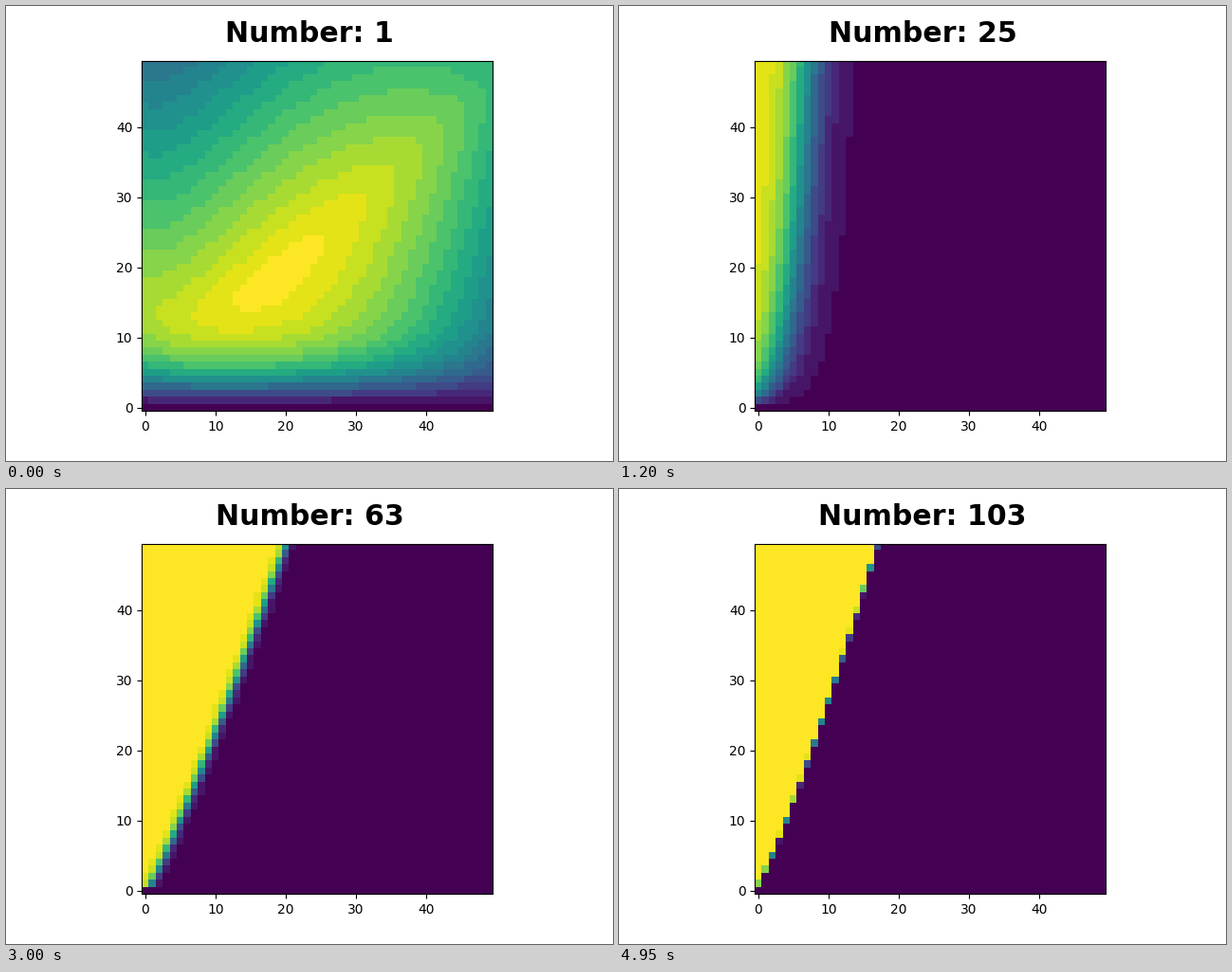
A matplotlib script for the animation above (5 s loop, 640 by 480 pixels).

```python
import numpy as np
import matplotlib.pyplot as plt
from matplotlib.animation import FuncAnimation

SIZE = 50
FRAMES = 100
COUNT = 104
SLOPE_AT, FRONT_AT = 9, 25
ZOOM = 4.3  # how much narrower the front is than the slope

X = np.arange(SIZE)
Y = np.maximum(np.arange(SIZE), 1)[:, None]
# Colour steps, a little closer together at the bright end
LEVELS = 1 - (1 - np.linspace(0, 1, 20)) ** 1.1

# Key poses of the sharp front: number, x at bottom, x at top, curvature
NUMBER, FOOT, REACH, POWER = zip(
    (25, -2, 7.1, 0.01),
    (46, 0.1, 11.5, 0.65),
    (63, 0.9, 20, 0.9),
    (79, 0.42, 19.3, 0.87),
    (103, 0.11, 16.92, 0.85),
)


def soft_abs(d, bend=0.04):
    return np.hypot(d, bend) - bend


def ridge_odds():
    """Diagonal crest that rises quickly from the bottom edge."""
    crest = 2 + 0.87 * X + 12 * np.exp(-X / 6)
    height = 1 - 0.3 * ((X - 18) / 30) ** 2
    above = Y - crest
    drop = soft_abs(above * np.where(above > 0, 0.0155, 0.008))
    rise = 1 - np.exp(-(Y / 4.8) ** 1.4)
    value = np.clip((height - drop) * rise, 0.01, 0.99)
    return np.log(value / (1 - value))


def slope_odds(x):
    """Wide ramp along a diagonal, steeper on its bright side."""
    d = 0.72 * Y + 0.8 - 18 / Y - x
    return d / np.where(d > 0, 6, 9.5)


def front_odds(n, x):
    """Narrow edge that sharpens steadily as n grows."""
    foot, reach, power = (np.interp(n, NUMBER, key)
                          for key in (FOOT, REACH, POWER))
    bend = (Y ** power - 1) / ((SIZE - 1) ** power - 1)
    width = 1.85 * np.exp(-0.042 * (n - FRONT_AT))
    return (foot + (reach - foot) * bend - x) / width


def mix(a, b, t):
    return a + (b - a) * t


def field(n):
    if n <= SLOPE_AT:
        t = (n - 1) / (SLOPE_AT - 1)
        odds = mix(ridge_odds(), slope_odds(X), t)
    elif n < FRONT_AT:
        t = (n - SLOPE_AT) / (FRONT_AT - SLOPE_AT)
        odds = mix(slope_odds(X * ZOOM ** t),
                   front_odds(FRONT_AT, X * ZOOM ** (t - 1)), t)
    else:
        odds = front_odds(n, X)
    value = 1 / (1 + np.exp(-np.clip(odds, -30, 30)))
    value[0] = 0
    nearest = np.abs(value[..., None] - LEVELS).argmin(axis=-1)
    return LEVELS[nearest]


fig, ax = plt.subplots(figsize=(6.4, 4.8), dpi=100)
image = ax.imshow(field(1), origin="lower", cmap="viridis", vmin=0, vmax=1,
                  interpolation="nearest")
title = fig.suptitle("Number: 1", y=0.968, fontsize=21.6, fontweight="bold")


def update(i):
    n = i * COUNT // FRAMES + 1
    image.set_data(field(n))
    title.set_text(f"Number: {n}")
    return image, title


anim = FuncAnimation(fig, update, frames=FRAMES, interval=50, repeat=True,
                     repeat_delay=0, blit=False)
plt.show()
```
